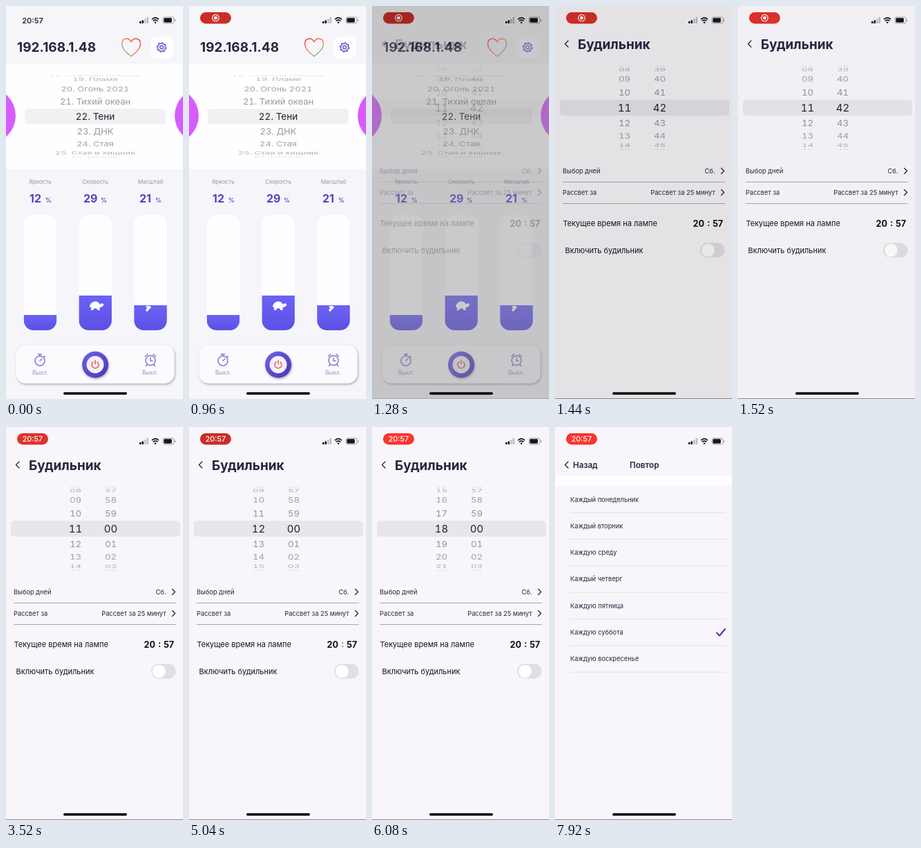
An HTML page for the animation above (8 s loop, 256 by 566 pixels).

```html
<!DOCTYPE html>
<html lang="ru">
<head>
<meta charset="utf-8">
<title>Будильник</title>
<style>
html, body { margin: 0; width: 100%; height: 100%; overflow: hidden; background: #f8f6fa; }
svg { display: block; width: 100%; height: 100%; }
text { font-family: Inter, Roboto, sans-serif; fill: #2a2440; }
.b { font-weight: 700; }
.sb { font-weight: 600; }
.mid { text-anchor: middle; }
.end { text-anchor: end; }
.row { font-size: 9.3px; }
.label { font-size: 8.2px; fill: #98969d; text-anchor: middle; }
.value { font-size: 16px; font-weight: 700; fill: #5940c0; }
.unit { font-size: 8.5px; font-weight: 700; fill: #5940c0; }
.off { font-size: 8.3px; fill: #a194d2; text-anchor: middle; }
.wheel text { text-anchor: middle; font-variant-numeric: tabular-nums; fill: #55535a; }
.wheel .front text { fill: #242328; }
.line { fill: none; stroke-linecap: round; stroke-linejoin: round; }
.chev { stroke: #2a2440; stroke-width: 1.4; }

.loop { animation: 8s linear infinite; }
#alarm { animation-name: alarm; }
#repeat { animation-name: repeat; }
#dim { animation-name: dim; }
#pill { animation-name: pill; }
#clock { animation-name: clock; }
#rec { animation-name: rec; }
#pillTime { animation-name: pillTime; }
#pillBg { animation: pulse 1s ease-in-out -1.96s infinite alternate; }
#colon { animation: blink 1s linear infinite; }

@keyframes alarm { 0%, 14.5% { opacity: 0 } 16% { opacity: .27 } 18%, 100% { opacity: 1 } }
@keyframes repeat { 0%, 97.3% { opacity: 0 } 98.9%, 100% { opacity: 1 } }
@keyframes dim { 0%, 12% { opacity: 0 } 16% { opacity: .2 } 19% { opacity: .025 } 22%, 100% { opacity: 0 } }
@keyframes pill { 0%, 4% { opacity: 0 } 6%, 100% { opacity: 1 } }
@keyframes clock { 0%, 4% { opacity: 1 } 6%, 100% { opacity: 0 } }
@keyframes rec { 0%, 26% { opacity: 1 } 28%, 100% { opacity: 0 } }
@keyframes pillTime { 0%, 26% { opacity: 0 } 28%, 100% { opacity: 1 } }
@keyframes pulse { from { fill: #fb352d } to { fill: #c92e29 } }
@keyframes blink { 0% { opacity: 0 } 8%, 56% { opacity: 1 } 64%, 100% { opacity: 0 } }
</style>
</head>
<body>
<svg viewBox="0 0 256 566" preserveAspectRatio="none">
  <defs>
    <linearGradient id="rainbow" gradientUnits="userSpaceOnUse" x1="172" y1="48" x2="190" y2="70">
      <stop offset="0" stop-color="#f0453c"/><stop offset=".55" stop-color="#f08a50"/><stop offset="1" stop-color="#58c878"/>
    </linearGradient>
    <linearGradient id="fill" x1="0" y1="0" x2="0" y2="1">
      <stop offset="0" stop-color="#6c62f6"/><stop offset="1" stop-color="#5d50e4"/>
    </linearGradient>
    <linearGradient id="ring" x1="0" y1="0" x2="1" y2="1">
      <stop offset="0" stop-color="#6f63ee"/><stop offset="1" stop-color="#4636b0"/>
    </linearGradient>
    <filter id="shadow" x="-20%" y="-20%" width="140%" height="150%">
      <feDropShadow dx="1" dy="1.5" stdDeviation="1.5" flood-color="#51486e" flood-opacity=".5"/>
    </filter>
  </defs>

  <g id="home">
    <rect width="256" height="566" fill="#f6f5f9"/>
    <rect y="83" width="256" height="152" fill="#fefdff"/>
    <text class="b" x="16" y="66" font-size="19">192.168.1.48</text>
    <path class="line" stroke="url(#rainbow)" stroke-width="1.4" d="M181 72.5C172 66 167.5 61 167.5 54.5C167.5 46.5 177 44 181 52C185 44 194.5 46.5 194.5 54.5C194.5 61 190 66 181 72.5Z"/>
    <rect x="209" y="44" width="33" height="32" rx="10" fill="#fefdff"/>
    <g class="line" stroke="#5a45c4" stroke-width="1.3">
      <path id="gear"/><circle cx="225" cy="59.5" r="2.3"/>
    </g>
    <circle cx="-26" cy="158" r="40" fill="#d65cff"/>
    <circle cx="284" cy="158" r="40" fill="#d65cff"/>
    <rect x="27" y="148" width="204" height="22" rx="5" fill="#f1f0f3"/>
    <g id="effects"></g>
    <g id="sliders"></g>
    <g fill="#fff">
      <path d="M121 433C122 424 134 423 136 430C138 427 142 428 141 431C140 433 138 433 137 434L135 435L136 438H132.500L131 435.500H127.500L126 438H122.500L123.500 435Z"/>
      <path d="M202 432H208L210 434L206 438L204 440.500L202 438L204 435Z"/>
    </g>
    <rect x="14.500" y="488.500" width="229" height="55" rx="14" fill="#fbfafd" filter="url(#shadow)"/>
    <g class="line" stroke="#8875cc" stroke-width="1.5">
      <circle cx="49" cy="511" r="7"/><path d="M46.500 501.500H51.500M49 502V504M55 504L56.500 505.500M49 511L52 508"/>
      <circle cx="209" cy="510.500" r="7"/><path d="M201.500 504.500L205 501.500M216.500 504.500L213 501.500M209 506.500V511H212M204 516.500L202.500 518.500M214 516.500L215.500 518.500"/>
    </g>
    <text class="off" x="49.500" y="531">Выкл.</text>
    <text class="off" x="208.500" y="531">Выкл.</text>
    <circle cx="129" cy="516.500" r="19" fill="url(#ring)" filter="url(#shadow)"/>
    <circle cx="129" cy="516.500" r="12.500" fill="#f4eff8"/>
    <path class="line" stroke="#e0605c" stroke-width="1.5" d="M125.800 512.800A5 5 0 1 0 132.200 512.800M129 510.500V515.500"/>
  </g>

  <g id="alarm" class="loop">
    <rect width="256" height="566" fill="#f8f6fa"/>
    <path class="line chev" d="M19 50L14.500 54.500L19 59"/>
    <text class="b" x="33" y="61.500" font-size="19">Будильник</text>
    <rect x="7" y="135" width="245" height="23" rx="5" fill="#e8e6ea"/>
    <g id="hours"></g>
    <g id="minutes"></g>
    <text class="row" x="11" y="240.500">Выбор дней</text>
    <text class="row end" x="231.500" y="240.500">Сб.</text>
    <text class="row" x="11" y="272">Рассвет за</text>
    <text class="row end" x="231.500" y="272">Рассвет за 25 минут</text>
    <path class="line chev" d="M240.500 233.500L244.500 237.500L240.500 241.500M240.500 264.500L244.500 268.500L240.500 272.500"/>
    <path d="M11 253.500H246M11 284.500H246" stroke="#aba9b0"/>
    <text x="11.500" y="317" font-size="11" style="fill:#17151c">Текущее время на лампе</text>
    <g class="b" font-size="12.600">
      <text x="199.500" y="317.500" style="fill:#111">20</text>
      <text id="colon" class="mid" x="222" y="317" style="fill:#111">:</text>
      <text x="228" y="317.500" style="fill:#111">57</text>
    </g>
    <text x="14.500" y="356" font-size="11" style="fill:#17151c">Включить будильник</text>
    <rect x="210" y="341" width="35.500" height="21.500" rx="10.750" fill="#e1dfe4"/>
    <circle cx="221.300" cy="351.800" r="9.400" fill="#fefeff"/>
    <rect y="565" width="256" height="1" fill="#8a898c"/>
  </g>

  <g id="repeat" class="loop">
    <rect width="256" height="566" fill="#f8f6fa"/>
    <rect y="70" width="256" height="15" fill="#fefdff"/>
    <path class="line chev" d="M19 50L14.500 54.500L19 59"/>
    <text class="sb" x="26" y="59" font-size="11.700">Назад</text>
    <text class="sb" x="108" y="59" font-size="11.700">Повтор</text>
    <g id="days"></g>
    <path class="line" stroke="#5a35b4" stroke-width="2.200" d="M234 296.500L238 300.500L246 291"/>
    <rect y="565" width="256" height="1" fill="#8a898c"/>
  </g>

  <g id="status">
    <text id="clock" class="loop sb mid" x="38.500" y="24.500" font-size="11">20:57</text>
    <g id="pill" class="loop">
      <rect id="pillBg" x="16" y="9" width="45" height="16.500" rx="8.250"/>
      <g id="rec" class="loop"><circle cx="38.500" cy="17.200" r="4.800" fill="none" stroke="#fff" stroke-width="1.200"/><circle cx="38.500" cy="17.200" r="2.400" fill="#fff"/></g>
      <g id="pillTime" class="loop"><text class="mid" x="38.500" y="21" font-size="10.800" font-weight="500" style="fill:#fff">20:57</text></g>
    </g>
    <g fill="#17161a">
      <path d="M193 22H195.500V25H193ZM196.500 20.500H199V25H196.500Z"/>
      <path d="M200 18.500H202.500V25H200ZM203.500 16H206V25H203.500Z" fill="#bdbbc1"/>
      <path class="line" style="stroke:#17161a" stroke-width="1.600" d="M211.500 18.800Q216 15 220.500 18.800M213.300 21.200Q216 19 218.700 21.200"/>
      <circle cx="216" cy="23.700" r="1.300"/>
      <rect x="227" y="16" width="16" height="9" rx="2.600" fill="none" stroke="#8d8b91" stroke-width=".8"/>
      <rect x="228.300" y="17.300" width="11.500" height="6.400" rx="1.400"/>
      <rect x="244" y="19" width="1" height="3" rx=".5" fill="#8d8b91"/>
      <rect x="83" y="556.300" width="92" height="3.400" rx="1.700" fill="#050505"/>
    </g>
  </g>
  <rect id="dim" class="loop" width="256" height="566"/>
</svg>
<script>
const $ = id => document.getElementById(id);
const LOOP = 8000, STEP = 0.372;

// A cylinder of labels; the part inside the selection band is drawn larger and darker.
function wheel(id, { x, cy, R, size, zoom, band, label }) {
  const slots = [-5, -4, -3, -2, -1, 0, 1, 2, 3, 4, 5];
  const texts = n => `<text font-size="${size}" y="${size * .364}"></text>`.repeat(n);
  const root = $(id), top = cy - band / 2, bottom = cy + band / 2;
  root.setAttribute('class', 'wheel');
  root.innerHTML =
    `<clipPath id="${id}In"><rect y="${top}" width="256" height="${band}"/></clipPath>
     <clipPath id="${id}Out"><rect y="${top - 60}" width="256" height="60"/><rect y="${bottom}" width="256" height="60"/></clipPath>
     <g class="back" clip-path="url(#${id}Out)">${texts(slots.length)}</g>
     <g class="front" clip-path="url(#${id}In)">${texts(slots.length)}</g>`;
  const [back, front] = ['.back', '.front'].map(s => [...root.querySelector(s).children]);

  function place(el, text, angle, k, opacity) {
    const visible = Math.abs(angle) < 1.53;
    el.textContent = visible ? text : '';
    el.setAttribute('opacity', opacity);
    el.setAttribute('transform', `translate(${x} ${cy + R * k * Math.sin(angle)}) scale(${k} ${k * Math.cos(angle)})`);
  }
  return value => slots.forEach((s, i) => {
    const n = Math.round(value) + s, angle = (n - value) * STEP;
    place(back[i], label(n), angle, 1, .32 + .3 * Math.cos(angle));
    place(front[i], label(n), angle, zoom, 1);
  });
}

const twoDigits = mod => n => String((n + mod) % mod).padStart(2, '0');
const effects = ['Осенние огоньки', 'Пламя', 'Огонь 2021', 'Тихий океан', 'Тени', 'ДНК', 'Стая', 'Стая и хищник', 'Метель'];
const setEffect = wheel('effects', {
  x: 129, cy: 159, R: 58.8, size: 13, zoom: 1.04, band: 22,
  label: n => effects[n - 18] ? `${n}. ${effects[n - 18]}` : ''
});
const timeWheel = { cy: 146.5, R: 60.6, size: 13.3, zoom: 1.13, band: 23 };
const setHours = wheel('hours', { ...timeWheel, x: 100.5, label: twoDigits(24) });
const setMinutes = wheel('minutes', { ...timeWheel, x: 151.5, label: twoDigits(60) });
setEffect(22);

$('sliders').innerHTML = [
  [49.5, 'Яркость', 12, 34, 57, 445],
  [129.2, 'Скорость', 29, 112, 137, 417],
  [209, 'Масштаб', 21, 193, 216, 431]
].map(([cx, name, value, vx, ux, level], i) => `
  <text class="label" x="${cx}" y="256">${name}</text>
  <text class="value" x="${vx}" y="282.500">${value}</text>
  <text class="unit" x="${ux}" y="282.500">%</text>
  <clipPath id="track${i}"><rect x="${cx - 23.7}" y="301" width="47.400" height="166" rx="14"/></clipPath>
  <g clip-path="url(#track${i})">
    <rect x="${cx - 24}" y="301" width="48" height="166" fill="#fefdff"/>
    <rect x="${cx - 24}" y="${level}" width="48" height="${467 - level}" fill="url(#fill)"/>
  </g>`).join('');

$('days').innerHTML = ['Каждый понедельник', 'Каждый вторник', 'Каждую среду', 'Каждый четверг',
  'Каждую пятница', 'Каждую суббота', 'Каждую воскресенье'].map((day, i) => {
  const y = 107.5 + i * 38.3;
  return `<text class="row" x="22" y="${y}">${day}</text><path d="M22 ${y + 15.7}H247" stroke="#e2e0e5"/>`;
}).join('');

$('gear').setAttribute('d', 'M' + Array.from({ length: 32 }, (_, i) => {
  const a = (i + .5) * Math.PI / 16, r = i % 4 < 2 ? 6.7 : 5.1;
  return `${225 + r * Math.cos(a)} ${59.5 + r * Math.sin(a)}`;
}).join('L') + 'Z');

const progress = (t, from, to) => Math.min(1, Math.max(0, (t - from) / (to - from)));
const easeOut = p => 1 - (1 - p) ** 2.4;
const easeInOut = p => p * p * (3 - 2 * p);

function draw(now) {
  const t = now % LOOP;
  setMinutes(42 + 18 * easeOut(progress(t, 1760, 3440)));
  setHours(11 + easeInOut(progress(t, 4240, 4880)) + 6 * easeOut(progress(t, 5120, 5920)));
  $('rainbow').setAttribute('gradientTransform', `rotate(${90 - t * .09} 181 59)`);
  requestAnimationFrame(draw);
}
draw(performance.now());
</script>
</body>
</html>
```
